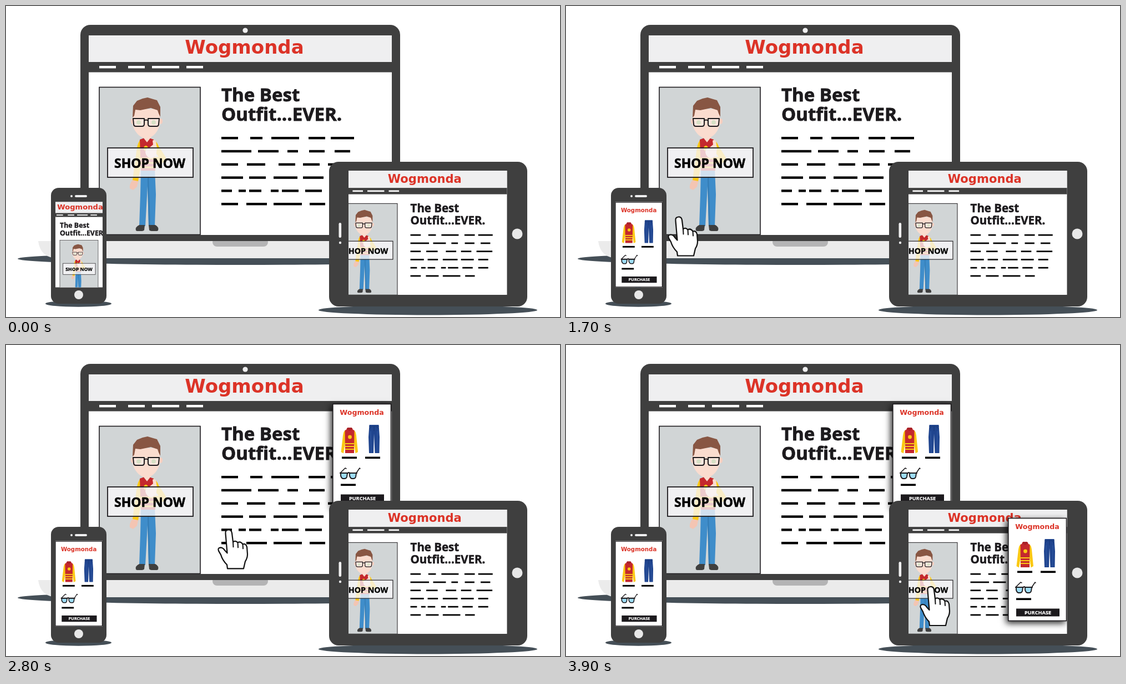
An HTML page with a canvas that plays this animation: 998 by 561 pixels, repeating every 4.9 s.

```html
<!DOCTYPE html>
<html lang="en">
<head>
<meta charset="utf-8">
<title>Shop the outfit on every screen</title>
<style>
  html, body { margin: 0; width: 100%; height: 100%; overflow: hidden; background: #fff; }
  canvas { display: block; width: 998px; height: 561px; }
</style>
</head>
<body>
<canvas id="stage" width="998" height="561"></canvas>
<script>
const ctx = document.getElementById('stage').getContext('2d');
const LOOP = 4900;
const DARK = '#3f3f3f', PALE = '#efeff0', SHADE = '#454f57', INK = '#1c1a1d';
const RED = '#dc3327', YELLOW = '#fbc914', SKIN = '#fadccf';
const BRAND = 'Wogmonda';

// Text rows: start and end of each dash, measured from the left margin.
const ROWS = [
  [0, 30, 52, 74, 90, 140, 157, 187, 197, 239],
  [0, 54, 66, 103, 119, 138, 158, 186, 204, 232],
  [0, 30, 46, 79, 103, 133, 147, 177, 192, 238],
  [0, 39, 50, 80, 94, 137, 147, 184, 197, 226],
  [0, 19, 31, 44, 50, 72, 89, 103, 109, 139, 151, 181, 197, 226],
  [0, 30, 45, 82, 94, 145, 159, 187]
];

function box(x, y, w, h, color) {
  ctx.fillStyle = color;
  ctx.fillRect(x, y, w, h);
}

function round(x, y, w, h, r, color) {
  ctx.beginPath();
  ctx.roundRect(x, y, w, h, r);
  ctx.fillStyle = color;
  ctx.fill();
}

function oval(x, y, rx, ry, color) {
  ctx.beginPath();
  ctx.ellipse(x, y, rx, ry, 0, 0, 7);
  ctx.fillStyle = color;
  ctx.fill();
}

function shape(d, fill, stroke, width) {
  const path = new Path2D(d);
  if (fill) { ctx.fillStyle = fill; ctx.fill(path); }
  if (stroke) {
    ctx.strokeStyle = stroke;
    ctx.lineWidth = width;
    ctx.lineJoin = ctx.lineCap = 'round';
    ctx.stroke(path);
  }
}

function outline(x, y, w, h, width) {
  ctx.strokeStyle = INK;
  ctx.lineWidth = width;
  ctx.lineJoin = 'miter';
  ctx.strokeRect(x, y, w, h);
}

// A thin stroke gives the bold face its extra weight.
function label(text, x, y, size, color = INK, align = 'left') {
  ctx.font = `700 ${size}px "Open Sans", sans-serif`;
  ctx.textAlign = align;
  ctx.fillStyle = ctx.strokeStyle = color;
  ctx.lineWidth = size * .025;
  ctx.lineJoin = 'miter';
  ctx.fillText(text, x, y);
  ctx.strokeText(text, x, y);
}

function brand(x, y, size) {
  ctx.font = `700 ${size}px "DejaVu Sans", sans-serif`;
  ctx.textAlign = 'center';
  ctx.fillStyle = RED;
  ctx.fillText(BRAND, x, y);
}

function within(x, y, w, h, draw) {
  ctx.save();
  ctx.beginPath();
  ctx.rect(x, y, w, h);
  ctx.clip();
  draw();
  ctx.restore();
}

function scaled(x, y, s, draw) {
  ctx.save();
  ctx.translate(x, y);
  ctx.scale(s, s);
  draw();
  ctx.restore();
}

function figure() {
  // legs and shoes
  shape('M243 294H268L270 340L268 397H257L255 325L251 397H240L242 340Z', '#3f8dca');
  shape('M255 312L257 397H260L257 303Z', '#357db6');
  shape('M234 405Q232 399 240 395H250L249 404Q248 406 243 406H236Z', DARK);
  shape('M274 405Q276 399 269 395H257L258 404Q259 406 264 406H272Z', DARK);
  // arms
  shape('M229 313Q222 320 223 329L229 332L236 326L239 313Z', '#f3c5b3');
  shape('M243 240Q237 245 235 262L228 314L238 316L246 268Z', YELLOW);
  shape('M264 240Q272 244 275 253L288 273Q290 280 282 283L262 284V273L275 272L264 258Z', YELLOW);
  // jacket
  shape('M241 241L249 238H258L266 241L269 297H243Z', '#c4282d');
  shape('M243 275H269M243 283H269M243 291H269', null, YELLOW, 3);
  shape('M247 237L254 246L261 237Z', SKIN);
  oval(252, 257, 4, 5, YELLOW);
  shape('M262 275Q253 274 251 264Q251 256 259 255L265 250L264 243Q267 240 270 244L272 257L270 271Z', SKIN);
  // head
  oval(228, 208, 3, 5, '#f7cfc0');
  oval(279, 208, 3, 5, '#f7cfc0');
  shape('M229 186H277V210C277 224 264 239 253 239C241 239 228 224 228 210Z', SKIN);
  shape('M228 201L229 180L236 171L246 167L255 165L265 168L272 170L278 182L278 200L275 194L273 188L261 184L242 188L233 187L231 198Z', '#885643');
  oval(239, 210, 4, 4, '#c6d3ad');
  oval(266, 210, 4, 4, '#c6d3ad');
  shape('M229 203H249V213Q249 217 245 217H234Q230 217 230 213ZM256 203H276L275 213Q275 217 271 217H260Q256 217 256 213ZM249 207Q252 204 256 207', 'rgba(255,255,255,.3)', INK, 2);
}

function hero() {
  box(168, 146, 182, 266, '#d1d5d6');
  figure();
  outline(168, 146.5, 182, 266, 1.6);
  box(183, 256, 154, 53, 'rgba(249,248,250,.78)');
  outline(183, 256, 154, 53, 1.8);
  label('SHOP NOW', 259, 292, 23, '#000', 'center');
}

function navDashes() {
  for (const [x, w] of [[168, 30], [220, 30], [263, 49], [325, 30]]) box(x, 108, w, 4.4, '#fff');
}

function page() {
  box(145, 45, 555, 375, '#fff');
  box(145, 45, 555, 56, PALE);
  box(145, 101, 555, 18.5, DARK);
  navDashes();
  brand(429.5, 86, 34);
  hero();
  label('The Best', 388, 172, 33);
  label('Outfit...EVER.', 388, 206.5, 33);
  ROWS.forEach((row, i) => {
    for (let j = 0; j < row.length; j += 2)
      box(388 + row[j], 236 + i * 23.8, row[j + 1] - row[j], 4.4, '#000');
  });
}

function jacket() {
  shape('M23 47Q19 49 18 57L14.5 87L19 89.5L23 64Z', YELLOW);
  shape('M37 47Q41 49 42 57L45 87L40.5 89.5L37 64Z', YELLOW);
  shape('M21.5 48Q25 47 25 44H35Q35 47 38.5 48L38 89H22Z', '#c4282d');
  shape('M25 46L26 43H34L35 46L30 49Z', '#a92228');
  shape('M22.5 72H37.5M22.5 77H37.5M22.5 82H37.5', null, YELLOW, 2.2);
  oval(30.5, 60, 3.4, 3.4, YELLOW);
}

function jeans() {
  shape('M65.5 38H82.5L84 60L83.5 89H75.5L74 54L73 89H65L64 60Z', '#20458f');
  shape('M68 50L69 87M80 50L79.5 87', null, '#2d559f', 1.4);
  shape('M65.5 41H82.5M74 41V49M66 45L69 42M82 45L79 42', null, '#16336f', .8);
}

function specs() {
  shape('M13 125L22 116L24 117M42 125L48 116L49 117', null, INK, 1.6);
  shape('M14 125H26L25 132Q24 135 21 135H18Q15 134 14 130ZM30 125H42L41 132Q40 135 37 135H34Q31 134 30 130Z', '#9ddcf6', INK, 1.9);
  shape('M13 125H27Q28 123 30 125H43', null, INK, 2.2);
}

function panel(x, y, s, h, top = 0) {
  ctx.save();
  ctx.shadowColor = 'rgba(0,0,0,.85)';
  ctx.shadowBlur = 11;
  ctx.shadowOffsetX = -3;
  ctx.shadowOffsetY = 4;
  box(x - 1, y, 105 * s + 1, h, '#fff');
  ctx.restore();
  outline(x - .2, y + .5, 105 * s - .3, h - 1, 1.6);
  scaled(x, y + top, s, () => {
    brand(52, 20, 12.6);
    jacket();
    jeans();
    specs();
    for (const [lx, ly] of [[16, 95.5], [58, 95.5], [14, 144.5]]) box(lx, ly, 27, 3.6, '#000');
    box(14, 163.5, 78, 14, INK);
    label('PURCHASE', 53, 174, 9.2, '#fff', 'center');
  });
}

function laptop(slide) {
  oval(422, 456, 401, 11, SHADE);
  shape('M58 424H786Q786 455 750 455H94Q62 455 58 424Z', '#ebebeb');
  round(372, 418, 100, 16, 8, '#b4b4b5');
  round(134, 34, 576, 390, [18, 18, 0, 0], DARK);
  oval(431, 44, 4.6, 4.6, PALE);
  within(149, 53, 546, 360, () => {
    page();
    if (slide < 1) panel(589 + 105 * slide, 106, 1, 186);
  });
}

function phonePage() {
  box(89, 353, 86, 155, '#fff');
  box(89, 353, 86, 21, PALE);
  box(89, 373.5, 86, 7, DARK);
  scaled(91 - 168 * .39, 377 - 110 * .39, .39, navDashes);
  brand(133.5, 367, 13.1);
  label('The Best', 97, 400, 12.4);
  label('Outfit...EVER.', 97, 413.5, 12.4);
  scaled(97 - 168 * .379, 422.5 - 146 * .379, .379, hero);
}

function phone(slide) {
  oval(130.5, 537, 59.5, 5.7, SHADE);
  round(81, 328, 100, 209, 14, DARK);
  round(124, 341, 22, 4, 2, PALE);
  oval(118, 343, 2, 2, PALE);
  oval(131, 521, 8, 8, '#e8e8e8');
  within(89, 353.5, 85, 154, () => {
    phonePage();
    if (slide < 1) panel(89 + 85 * slide, 353.5, .81, 154, 2);
  });
}

function tablet(slide) {
  oval(760, 548.5, 197, 9, SHADE);
  round(582, 281, 357, 261, 17, DARK);
  oval(921, 411, 9.5, 9.5, '#e8e8e8');
  round(599.5, 391, 4.6, 27, 2.3, PALE);
  oval(602, 427, 2.2, 2.2, PALE);
  within(617, 297, 285.5, 224, () => {
    scaled(705 - 350 * .62, 356 - 146 * .62, .62, page);
    if (slide < 1) panel(797 + 105 * slide, 312, 1, 186);
  });
}

function pointer(x, y) {
  scaled(x, y, 1, () => {
    shape('M14.5 9Q13.5 2.5 19.5 2Q25 1.5 26 8L28 24Q32 20.5 36.5 25Q41.5 22 45.5 28Q51 26 53 33L54 46Q54 53 50 59L47 72L18 72L17 65Q9 57 6 47L2 40Q0 35 5 34Q10 34 13 39L17.5 44Z', '#fff', '#111', 2.2);
    shape('M28 24L28.5 33M36.5 25L37 34M45.5 28L46 36', null, '#111', 2);
  });
}

// Motion advances every 100 ms.
function steps(t, start, count) {
  return Math.max(0, Math.min(count, Math.floor((t - start) / 100) + 1));
}

function slideAt(t, start) {
  const n = steps(t, start, 6);
  return n ? .94 * (6 - n) / 5 : 1;
}

function pointerAt(t) {
  const enter = steps(t, 200, 5) / 5;
  if (!enter) return null;
  const up = steps(t, 1500, 6) / 6, across = steps(t, 2700, 6) / 6;
  return [308 - 195 * enter + 140 * up + 384 * across,
          565 - 88 * enter - 197 * up + 154 * across];
}

const begin = performance.now();
function frame() {
  const t = (performance.now() - begin) % LOOP;
  box(0, 0, 998, 561, '#fff');
  laptop(slideAt(t, 2100));
  phone(slideAt(t, 800));
  tablet(slideAt(t, 3400));
  const at = pointerAt(t);
  if (at) pointer(...at);
  requestAnimationFrame(frame);
}
frame();
</script>
</body>
</html>
```
